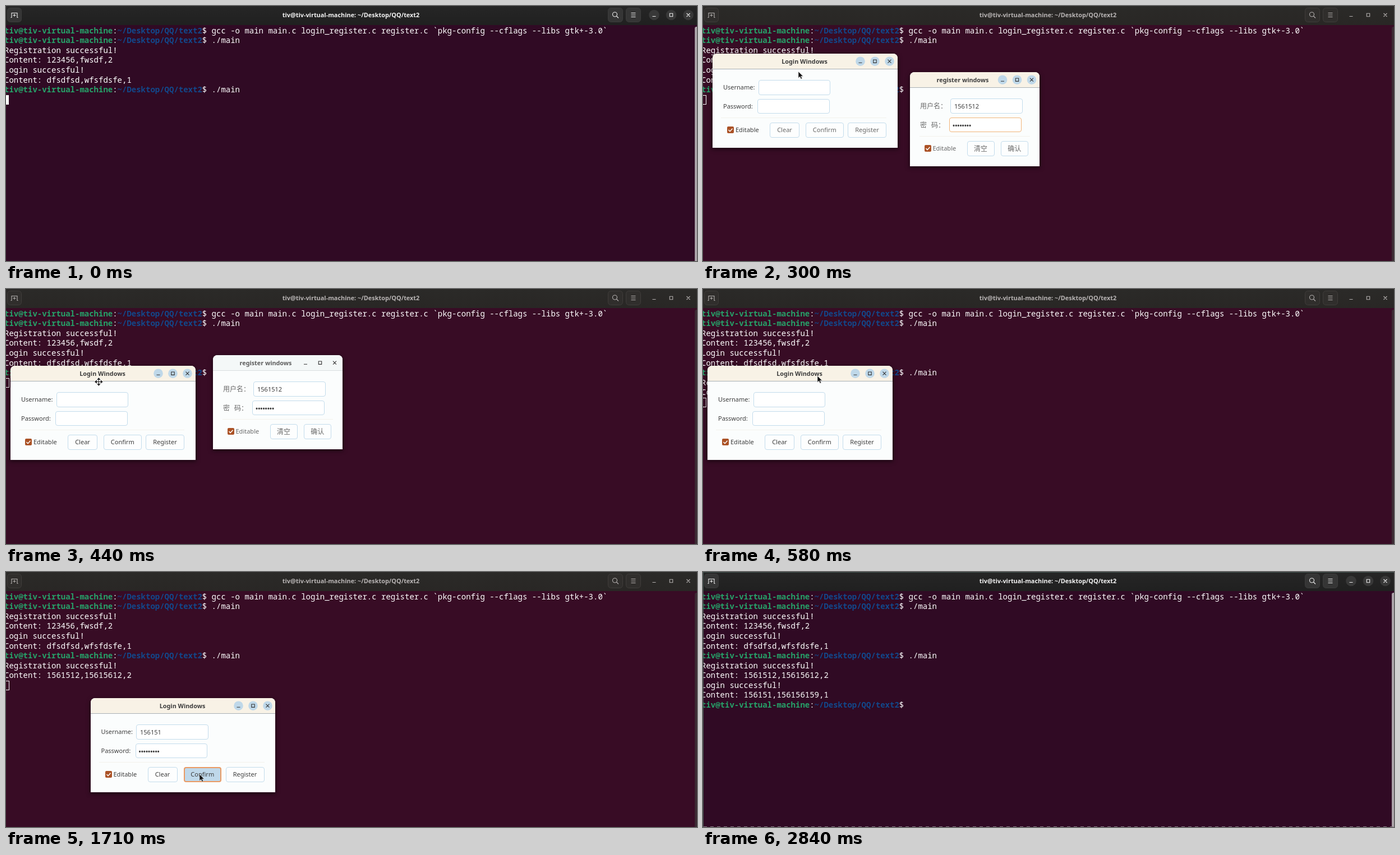
Animation, 1232 px wide and 455 px high, one loop 2.9 s. Source, as an HTML page:

```html
<!DOCTYPE html>
<html lang="en">
<head>
<meta charset="utf-8">
<title>Login demo</title>
<style>
html, body { margin: 0; width: 100%; height: 100%; overflow: hidden; background: #300a24; }
#stage { position: relative; width: 1232px; height: 455px; overflow: hidden; background: #300a24;
  font: 11px "Noto Sans", "Open Sans", sans-serif; color: #3d3d3d; }
#stage * { position: absolute; box-sizing: border-box; white-space: pre; }
#stage .line span { position: static; }
svg { left: 0; top: 0; overflow: visible; fill: none; }

.bar { left: 0; top: 0; width: 1232px; height: 34px; background: linear-gradient(#262626, #202020); }
.bar .title { left: 0; width: 1230px; top: 0; line-height: 32px; text-align: center;
  font-size: 10.9px; font-weight: 700; color: #f4f4f4; }
.bar svg { stroke: #f0f0f0; stroke-width: 1.1; }
.bar .key { fill: #353535; stroke: #3c3c3c; stroke-width: 1; }
.bar .round { fill: #383838; stroke: none; }
.scroll { left: 1228px; top: 37px; width: 4px; height: 430px; border-radius: 3px 0 0 0; background: #aba3a8; }
.line { left: -3px; height: 17.55px; line-height: 17.55px; color: #fff;
  font-family: "Noto Sans Mono", "DejaVu Sans Mono", monospace; font-size: 14px; }
.user { color: #26a269; font-weight: 700; }
.path { color: #12488b; font-weight: 700; }
.caret { left: -4px; width: 9px; height: 17.5px; background: #fff; }

.away { background: #380c25 !important; }
.away .bar { background: linear-gradient(#2b2a28, #292725); }
.away .bar .title { color: #b9b5b5; }
.away .bar svg { stroke: #b5b1b0; }
.away .bar .key { fill: #302e2c; stroke: #403d3b; }
.away .bar .round { fill: none; }
.away .scroll { background: #3b2932; }
.away .caret { width: 10px; background: none; border: 1px solid #fff; }

.edge { inset: 0; border: 0 solid #40504c; border-width: 1px 0 0 1px; }
.edge i { left: 0; bottom: 0; width: 100%; height: 1px;
  background: repeating-linear-gradient(90deg, #8d7c88 0 6px, transparent 6px 12px); }

.win { height: 168px; border-radius: 8px 8px 0 0; background: #fbfdfd;
  box-shadow: 0 2px 7px 1px rgba(0, 0, 0, .5); }
.head { left: 0; top: 0; width: 100%; height: 28px; border-radius: 8px 8px 0 0;
  background: #f8f2e6; border-bottom: 1px solid #a9b0b4; }
.win .title { top: 0; width: 140px; line-height: 27px; text-align: center; font-weight: 700; font-size: 10.8px; }
.win svg { stroke: #333; stroke-width: 1.1; }
.win .round { fill: #bfd8e9; stroke: none; }
.label { line-height: 20px; }
.entry { width: 128.5px; height: 26.5px; border: 1px solid #c3dcec; border-radius: 4px; background: #fff;
  padding-left: 6px; line-height: 25px; }
.entry.pass { padding-left: 5px; font-weight: 700; }
.rule { height: 1px; background: #f3f2ec; }
.check { left: 26px; top: 130px; width: 12px; height: 12px; border-radius: 2px; background: #ab5226; }
.check svg { stroke: #fff; stroke-width: 1.5; }
.btn { height: 26.5px; border: 1px solid #c3dcec; border-radius: 4px; background: #fdfefe;
  text-align: center; line-height: 24.5px; }
.cjk { font-family: "Noto Sans CJK SC", "Noto Sans CJK", sans-serif; font-size: 12px; }
.soft .btn, .dim .btn, .dim .label { color: #686868; }
.hot { border: 2px solid #ea9a63; background: #bfd8ea; line-height: 22.5px; }
.focus { border: 1.5px solid #f0b478; }
.back .head { background: #f4f8f8; border-color: #d9dedf; }
.back .title { color: #5c5c5c; }
.back .round { fill: none; }
.closing { opacity: .64; transform: scale(.929); box-shadow: none; }
.closing .head { background: #eceff2; border-color: transparent; }
.closing .title { color: #3a3a3a; }
.closing .round { fill: #dfe3e7; }
</style>
</head>
<body>
<div id="stage"></div>
<script>
const stage = document.getElementById('stage');
const box = (cls, x, y, w, text = '') =>
  `<div class="${cls}" style="left:${x}px;top:${y}px;${w ? `width:${w}px` : ''}">${text}</div>`;

// minimise, maximise and close buttons
const controls = (xs, y, r) => {
  const [a, b, c] = xs;
  return xs.map(x => `<circle class="round" cx="${x}" cy="${y}" r="${r}"/>`).join('') +
    `<path d="M${a - 3} ${y + 2.5}h6M${b - 2.7} ${y - 2.7}h5.4v5.4h-5.4z` +
    `M${c - 3} ${y - 3}l6 6m0-6l-6 6"/>`;
};
const key = (x, w) => `<rect class="key" x="${x}" y="3.5" width="${w}" height="25" rx="5"/>`;

const host = 'tiv@tiv-virtual-machine', dir = '~/Desktop/QQ/text2';
const prompt = cmd => `<span class="user">${host}</span>:<span class="path">${dir}</span>$ ${cmd}`;
const lines = [
  prompt('gcc -o main main.c login_register.c register.c `pkg-config --cflags --libs gtk+-3.0`'),
  prompt('./main'), 'Registration successful!', 'Content: 123456,fwsdf,2',
  'Login successful!', 'Content: dfsdfsd,wfsfdsfe,1',
  prompt('./main'), 'Registration successful!', 'Content: 1561512,15615612,2',
  'Login successful!', 'Content: 156151,156156159,1', prompt('')
];
const rowY = i => 34.8 + 17.55 * i;

const bar = `<div class="bar"><div class="title">${host}: ${dir}</div><svg width="1232" height="34">
  ${key(2.5, 25)}${key(1073.5, 26)}${key(1105.5, 26)}
  <path d="M10 20.5v-8h10v8M8.5 20.5h2M19.5 20.5h2M15 14v5M12.5 16.5h5"/>
  <circle cx="1085.5" cy="15" r="4"/><path d="M1088.5 18l3.5 3.5"/>
  <path d="M1114.5 12.5h8M1114.5 16h8M1114.5 19.5h8"/>
  ${controls([1155.5, 1186, 1216.5], 16, 9.3)}</svg></div>`;

const frame = (id, w, title, mid, xs, body) =>
  `<div class="win" id="${id}" style="width:${w}px"><div class="head"></div>
  ${box('title', mid - 70, 0, 0, title)}<svg width="${w}" height="28">${controls(xs, 13.7, 8.3)}</svg>${body}
  <div class="check"><svg width="12" height="12"><path d="M2.5 6l2.5 2.7l4.5-5"/></svg></div>
  ${box('label', 41, 126, 0, 'Editable')}</div>`;

const login = frame('login', 329.5, 'Login Windows', 164, [263.5, 289.5, 315.5],
  box('label', 19, 50, 0, 'Username:') + box('entry name', 81.5, 47, 0) +
  box('label', 19, 84, 0, 'Password:') + box('entry pass', 80, 80.7, 0) +
  box('rule', 15, 114, 295) + box('btn', 102, 123, 53, 'Clear') +
  box('btn ok', 166, 123, 67.5, 'Confirm') + box('btn', 241, 123, 69, 'Register'));

const register = frame('register', 231, 'register windows', 94.5, [165, 191, 217],
  box('label cjk', 18.5, 50, 0, '用户名：') + box('entry name', 72.5, 47, 0) +
  box('label cjk', 18.5, 84, 0, '密   码：') + box('entry pass', 70.5, 80.7, 0) +
  box('rule', 17, 114, 197) + box('btn cjk', 102, 123, 49, '清空') +
  box('btn cjk ok', 162, 123, 49.5, '确认'));

const cross = 'M-5 0H5M0-5V5M-2-4L0-6.5L2-4zM-2 4L0 6.5L2 4zM-4-2L-6.5 0L-4 2zM4-2L6.5 0L4 2z';
const pointers = `<svg id="pointer" width="1" height="1">
  <path class="arrow" d="M0 0v11.5l2.7-2.5l2 4.3l2-1l-2-4h3.7z" fill="#111" stroke="#ddd" stroke-width=".7"/>
  <g class="move"><path d="${cross}" stroke="#fff" stroke-width="3"/>
    <path d="${cross}" stroke="#222" stroke-width="1.2" fill="#222"/></g>
  <path class="beam" d="M-3-7q3 0 3 2q0-2 3-2M0-5V5M-3 7q3 0 3-2q0 2 3 2" stroke="#e8e2e4" stroke-width="1.2"/>
  </svg>`;

stage.innerHTML = bar + '<div class="scroll"></div>' +
  lines.map((s, i) => box('line', -3, rowY(i), 0, s)).join('') +
  '<div class="caret"></div>' + register + login + pointers + '<div class="edge"><i></i></div>';

const $ = s => stage.querySelector(s);
const rows = [...stage.querySelectorAll('.line')];

// Windows: [x, y, classes, name, password length, highlighted part]
const steps = [
  { at: 0, rows: 7 },
  { at: 170, rows: 7, login: [17, 85, ''], ptr: ['arrow', 293, 222] },
  { at: 235, rows: 7, login: [17, 85, 'back dim'], reg: [368.5, 118, '', '1561512', 0, '.name'], ptr: ['arrow', 520, 178] },
  { at: 300, rows: 7, login: [17, 85, 'soft'], reg: [368.5, 118, 'dim', '1561512', 8, '.pass'], ptr: ['arrow', 170, 117] },
  { at: 370, rows: 7, login: [12, 111, ''], reg: [368.5, 118, 'back dim', '1561512', 8], ptr: ['move', 169, 139] },
  { at: 440, rows: 7, login: [8, 137, ''], reg: [368.5, 118, 'back dim', '1561512', 8], ptr: ['move', 165.3, 165.5] },
  { at: 510, rows: 7, login: [8, 137, 'back dim'], reg: [368.5, 118, '', '1561512', 8, '.ok'], ptr: ['arrow', 555, 255] },
  { at: 575, rows: 9, login: [8, 137, ''], ptr: ['arrow', 204, 155] },
  { at: 640, rows: 9, login: [28, 208, ''], ptr: ['move', 224, 227] },
  { at: 1710, rows: 9, login: [150.5, 225, '', '156151', 9, '.ok'], ptr: ['arrow', 345, 361] },
  { at: 1770, rows: 11, login: [150.5, 225, 'closing back', '156151', 9, '.ok'], ptr: ['beam', 345.5, 362] },
  { at: 2840, rows: 12, edge: true }
];

function place(id, state) {
  const el = $(id);
  el.style.display = state ? '' : 'none';
  if (!state) return;
  const [x, y, cls, name = '', dots = 0, lit] = state;
  el.className = 'win ' + cls;
  el.style.left = x + 'px';
  el.style.top = y + 'px';
  el.querySelector('.name').textContent = name;
  el.querySelector('.pass').textContent = '•'.repeat(dots);
  for (const part of ['.name', '.pass', '.ok'])
    el.querySelector(part).classList.toggle(part === '.ok' ? 'hot' : 'focus', part === lit);
}

function show(s) {
  const active = !s.login || s.login[2].includes('closing');
  stage.className = active ? '' : 'away';
  rows.forEach((r, i) => r.style.display = i < s.rows ? '' : 'none');
  $('.caret').style.display = s.edge ? 'none' : '';
  $('.caret').style.top = rowY(s.rows) + .9 + 'px';
  $('.edge').style.display = s.edge ? '' : 'none';
  place('#login', s.login);
  place('#register', s.reg);
  const [kind, x, y] = s.ptr || ['', 0, 0];
  $('#pointer').style.transform = `translate(${x}px,${y}px)`;
  for (const k of ['arrow', 'move', 'beam'])
    $('#pointer .' + k).style.display = k === kind ? '' : 'none';
}

let last;
function tick() {
  const t = performance.now() % 2900;
  const s = steps.findLast(p => p.at <= t);
  if (s !== last) show(last = s);
  requestAnimationFrame(tick);
}
tick();
</script>
</body>
</html>
```
